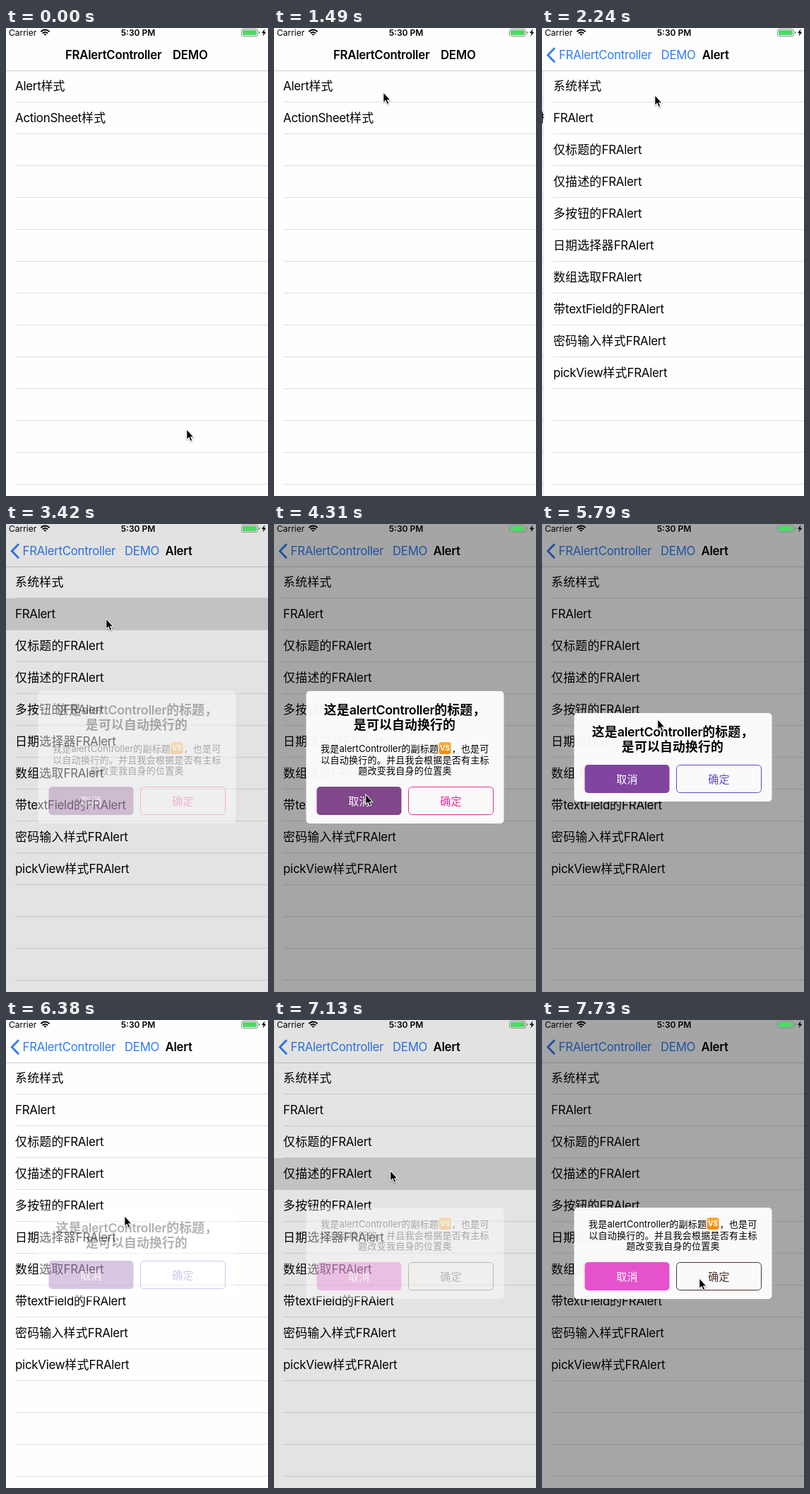
An HTML page with a canvas for the animation above (8000 ms loop, 371 px wide and 661 px high).

```html
<!DOCTYPE html>
<html lang="zh-CN">
<head>
<meta charset="utf-8">
<style>
html, body { margin: 0; width: 100%; height: 100%; overflow: hidden; background: #fff }
canvas { display: block }
</style>
</head>
<body>
<canvas id="stage" width="371" height="661"></canvas>
<script>
const W = 371, H = 661, ROW = 45, LOOP = 8000, TICK = 148.7, PUSH = 13;
const BLUE = '#2f7cf6', FAMILY = 'Inter, "Noto Sans CJK SC", "Noto Sans CJK", sans-serif';
const stage = document.getElementById('stage').getContext('2d');
const layer = Object.assign(document.createElement('canvas'), { width: W, height: H }).getContext('2d');
let g = stage;

const MENU = ['Alert样式', 'ActionSheet样式'];
const STYLES = ['系统样式', 'FRAlert', '仅标题的FRAlert', '仅描述的FRAlert', '多按钮的FRAlert', '日期选择器FRAlert',
  '数组选取FRAlert', '带textField的FRAlert', '密码输入样式FRAlert', 'pickView样式FRAlert'];

// Times are in ticks; title and note say which parts the box holds
const ALERTS = [
  { start: 23, end: 31, row: 1, title: 1, note: 1, cancel: '#80488a', ok: '#ee2a92' },
  { start: 37, end: 43, row: 2, title: 1, note: 0, cancel: '#8145a0', ok: '#6246c6' },
  { start: 48, end: 99, row: 3, title: 0, note: 1, cancel: '#e453cb', ok: '#4b3426' }
];

// Pointer glides, each starting where the one before ended
const REST = { x: 256, y: 567 };
const GLIDES = [
  { from: 0, to: 3, x: 210, y: 336 },
  { from: 4, to: 10, x: 155, y: 91 },
  { from: PUSH, to: 14, x: 160, y: 95 },
  { from: 20, to: 21, x: 142, y: 134 },
  { from: 23, to: 29, x: 130, y: 382 },
  { from: 31, to: 36, x: 154, y: 175 },
  { from: 38, to: 41, x: 172, y: 357 },
  { from: 42, to: 45, x: 165, y: 213 },
  { from: 48, to: 52, x: 223, y: 365 }
];

const mix = (a, b, p) => a + (b - a) * p;
const clamp = v => Math.max(0, Math.min(1, v));
const easeOut = p => 1 - (1 - p) ** 2;

function rect(x, y, w, h, color) {
  g.fillStyle = color;
  g.fillRect(x, y, w, h);
}

function round(x, y, w, h, r, fill, line) {
  g.beginPath();
  g.roundRect(x, y, w, h, r);
  if (fill) { g.fillStyle = fill; g.fill(); }
  if (line) { g.strokeStyle = line; g.lineWidth = 1; g.stroke(); }
}

function path(d, fill, line, width) {
  const shape = new Path2D(d);
  if (line) { g.strokeStyle = line; g.lineWidth = width; g.stroke(shape); }
  if (fill) { g.fillStyle = fill; g.fill(shape); }
}

// Latin is set slightly tight at larger sizes, Chinese slightly loose
function text(s, x, y, size, { color = '#000', weight = 400, center = false, alpha = 1 } = {}) {
  g.save();
  g.globalAlpha *= alpha;
  g.fillStyle = color;
  g.font = `${weight} ${size}px ${FAMILY}`;
  const runs = s.match(/[\u2e80-\uffff]+|[^\u2e80-\uffff]+/g).map(run => {
    const gap = run > '\u2e80' ? .25 : size > 15 ? -.27 : 0;
    g.letterSpacing = gap + 'px';
    return { run, gap, width: g.measureText(run).width };
  });
  if (center) x -= runs.reduce((sum, r) => sum + r.width, 0) / 2;
  for (const r of runs) {
    g.letterSpacing = r.gap + 'px';
    g.fillText(r.run, x, y);
    x += r.width;
  }
  g.restore();
}

function table(rows, x, lit, glow) {
  g.save();
  g.translate(x, 0);
  rect(0, 61, W, H, '#fefefe');
  for (let y = 104; y < H; y += ROW) rect(13, y, W, 1, '#e0e0e2');
  g.globalAlpha = glow;
  rect(0, 60 + ROW * lit, W, ROW, '#d9d9d9');
  g.globalAlpha = 1;
  rows.forEach((s, i) => text(s, 13, 88.3 + ROW * i, 16.9));
  g.restore();
}

function statusBar() {
  text('Carrier', 4, 10.8, 12);
  text('5:30 PM', 187, 10.8, 12, { weight: 600, center: true });
  for (const r of [1.8, 5, 8.4]) {
    g.beginPath();
    g.arc(55.5, 11, r, -Math.PI * .76, -Math.PI * .24);
    g.strokeStyle = '#000';
    g.lineWidth = 2;
    g.stroke();
  }
  round(333.5, 1.5, 23, 10, 2, null, '#8a8a8a');
  round(335, 3, 20, 7, 1, '#4cd964');
  rect(358, 5, 1.4, 3, '#8a8a8a');
  path('M366.5 1.5l-4.5 5.5h2.7l-1.2 4.5 4.8-5.8h-2.8z', '#000');
}

function navBar(p) {
  rect(0, 0, W, 60, '#fdfdfd');
  rect(0, 60, W, 1, '#cfcfd1');
  for (const style of [{ weight: 600, alpha: 1 - p }, { color: BLUE, alpha: p }]) {
    text('FRAlertController', mix(84, 23.5, p), 44, 16.8, style);
    text('DEMO', mix(236, 168, p), 44, 16.8, style);
  }
  text('Alert', mix(W, 225.5, p), 44, 16.8, { weight: 600, alpha: p });
  g.globalAlpha = p;
  path('M18 28.3l-9.7 10 9.7 10', null, BLUE, 2.8);
  g.globalAlpha = 1;
}

function badge(x, y) {
  const shade = g.createLinearGradient(0, y, 0, y + 17);
  shade.addColorStop(0, '#fbb034');
  shade.addColorStop(1, '#f08a0c');
  round(x, y, 17, 17, 3.5, shade);
  text('VS', x + 8.5, y + 12.3, 10, { color: '#fff', weight: 700, center: true });
}

function alertBody(a, top, bottom) {
  const button = bottom - 52, note = button - 49, mid = { center: true };
  if (a.title) {
    const bold = { weight: 600, center: true };
    text('这是alertController的标题，', 185, top + 32.5, 17.8, bold);
    text('是可以自动换行的', 185, top + 53.5, 17.8, bold);
  }
  if (a.note) {
    text('我是alertController的副标题', 66, note, 13);
    badge(233.5, note - 14);
    text('，也是可', 251.5, note, 13);
    text('以自动换行的。并且我会根据是否有主标', 185.5, note + 15.6, 13, mid);
    text('题改变我自身的位置奥', 185.5, note + 31, 13, mid);
  }
  round(60.5, button, 120, 40, 5, a.cancel);
  round(190.5, button + .5, 120, 39, 5, null, a.ok);
  text('取消', 120.5, button + 25.6, 15, { color: '#fff', center: true });
  text('确定', 250.5, button + 25.6, 15, { color: a.ok, center: true });
}

function alertBox(a, n) {
  const closing = n === a.end;
  const alpha = closing ? .3 : clamp(.3 + .55 * (n - a.start));
  const height = 67 + 58 * a.title + 62 * a.note, top = 329.5 - height / 2;
  if (!closing) rect(0, 0, W, H, `rgba(0,0,0,${.35 * alpha})`);
  // The panel fades in ahead of its content
  round(45.5, top, 280, height, 5, `rgba(255,255,255,${.95 * clamp(alpha * 1.5)})`);
  g = layer;
  g.clearRect(0, 0, W, H);
  alertBody(a, top, top + height);
  g = stage;
  g.globalAlpha = alpha;
  g.drawImage(layer.canvas, 0, 0);
  g.globalAlpha = 1;
}

function pointer(n) {
  let { x, y } = REST;
  for (const s of GLIDES) {
    const p = easeOut(clamp((n - s.from) / (s.to - s.from)));
    x = mix(x, s.x, p);
    y = mix(y, s.y, p);
  }
  g.save();
  g.translate(x, y);
  g.shadowColor = 'rgba(0,0,0,.35)';
  g.shadowBlur = 2;
  g.shadowOffsetY = 1;
  const arrow = 'M.3 1v12.2l2.9-2.6 2.4 5.4 1.6-.7-2.4-5.1h4z';
  path(arrow, null, '#fff', 2);
  g.shadowColor = 'transparent';
  path(arrow, '#000');
  g.restore();
}

function draw(n) {
  // Critically damped slide of the second page
  const wt = 18.3 * (.08 + (n - PUSH) * TICK / 1000);
  let off = n < PUSH ? W : W * (1 + wt) * Math.exp(-wt);
  if (off < 1) off = 0;
  const p = 1 - off / W;
  const a = ALERTS.find(a => n >= a.start && n <= a.end);
  const glow = start => n < start ? 0 : clamp(1 - (n - start) / 2);

  table(MENU, -.3 * W * p, 0, glow(PUSH));
  rect(0, 61, W, H, `rgba(0,0,0,${.05 * p})`);
  table(STYLES, off, a ? a.row : 0, a ? glow(a.start) : 0);
  navBar(p);
  if (a) alertBox(a, n);
  statusBar();
  pointer(n);
}

function play() {
  const t = performance.now() % LOOP;
  draw(Math.min(52, Math.floor((t + 15) / TICK)));
  requestAnimationFrame(play);
}
play();
</script>
</body>
</html>
```
